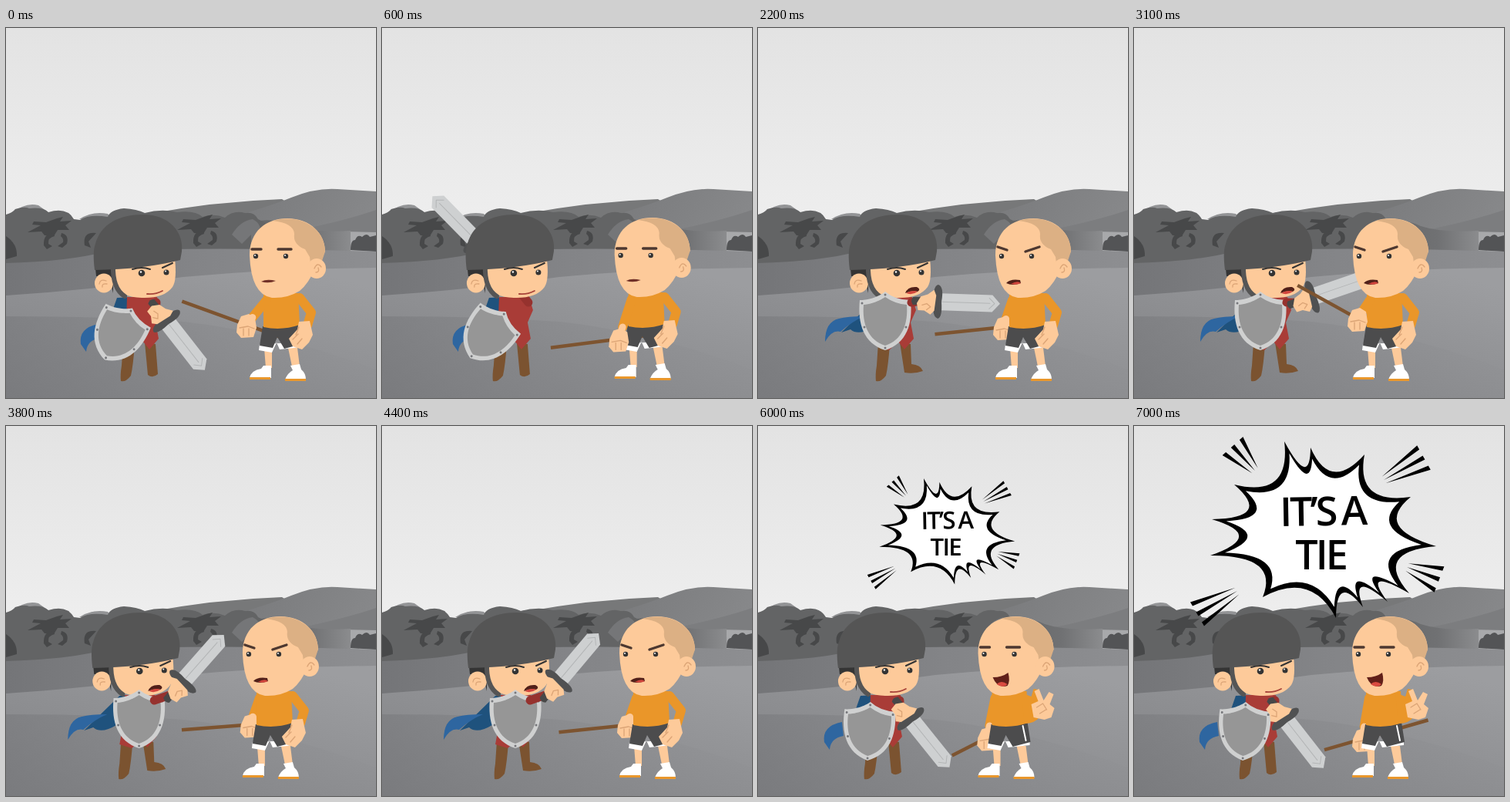
An HTML page for the animation above (7.2 s loop, 480 by 480 pixels).

```html
<!DOCTYPE html>
<html lang="en">
<head>
<meta charset="utf-8">
<title>Duel</title>
<style>
html, body { margin: 0; width: 100%; height: 100%; overflow: hidden; background: #eee; }
svg { display: block; width: 100vw; height: 100vh; }
.line { fill: none; stroke-linecap: round; stroke-linejoin: round; }
.skin { fill: #fdca9a; }
.crease { stroke: #dba476; stroke-width: 1.3; }
.word { font: 600 52px "Open Sans", "Noto Sans", sans-serif; letter-spacing: -3px; word-spacing: -3px; text-anchor: middle; }
</style>
</head>
<body>
<svg id="stage" viewBox="0 0 480 480">
<defs>
  <linearGradient id="sky" x2="0" y2="1"><stop stop-color="#e3e3e3"/><stop offset="1" stop-color="#f0f0f0"/></linearGradient>
  <linearGradient id="hill" x2="1" y2=".3"><stop stop-color="#78797b"/><stop offset="1" stop-color="#87888a"/></linearGradient>
  <linearGradient id="wood"><stop stop-color="#676869"/><stop offset=".55" stop-color="#707173"/><stop offset="1" stop-color="#8b8c8e"/></linearGradient>
  <linearGradient id="far"><stop stop-color="#747578"/><stop offset=".5" stop-color="#838487"/><stop offset="1" stop-color="#8d8e91"/></linearGradient>
  <linearGradient id="near" x1="0" y1="1" x2=".8" y2="0"><stop stop-color="#808184"/><stop offset="1" stop-color="#9c9da0"/></linearGradient>
  <linearGradient id="shade"><stop stop-color="#727376" stop-opacity=".45"/><stop offset="1" stop-color="#8a8b8e" stop-opacity=".1"/></linearGradient>
  <g id="spot" fill="#474849">
    <path d="M28 265L45 256 34 255 36 251 52 252 66 247 74 245 70 251 85 250 77 256 82 262 67 262 62 270 50 269 46 264Z"/>
    <path d="M62 266Q48 266 49 282L53 287 60 283 55 280Q54 272 63 270ZM72 266Q82 268 79 280L73 285 67 283 74 278Q75 273 71 270Z"/>
  </g>
</defs>

<g id="scene">
  <rect width="480" height="300" fill="url(#sky)"/>
  <path fill="#777879" d="M180 242Q270 225 358 222L420 262H180Z"/>
  <path fill="url(#hill)" d="M290 246Q340 232 370 220 402 207 430 209L480 212V300H300Z"/>
  <path fill="#7c7d7f" d="M380 262Q440 250 480 236V265H390Z"/>
  <path fill="#939496" d="M10 240Q24 226 42 230L56 240ZM95 248Q112 237 132 241L140 250Z"/>
  <path fill="#a8a9ab" d="M438 264L480 265V290H440Z"/>
  <path fill="url(#wood)" d="M330 250Q350 247 372 257 400 266 447 263V290H330Z"/>
  <path fill="#636465" d="M0 242Q8 240 12 235 24 231 30 234 48 232 55 239 79 232 88 248L96 249Q108 241 132 245 135 236 153 234 170 235 180 240 202 234 222 239 245 236 255 245 270 240 284 246 295 236 310 240 322 238 327 248L357 263V290L0 306Z"/>
  <path fill="#757678" d="M293 268Q304 250 320 248 334 255 328 270L318 285 318 268 306 280Z"/>
  <use href="#spot"/>
  <use href="#spot" x="194" y="-3"/>
  <path fill="#474849" d="M0 270Q15 280 14 296L0 300ZM117 266Q99 264 102 282L110 285 107 277ZM340 262L352 266 348 275 360 288H338Z"/>
  <path fill="#535456" d="M447 288Q447 275 453 275 456 267 462 271 468 265 472 271L480 269V290Z"/>
  <path fill="url(#far)" d="M0 305Q80 303 130 290 250 283 480 290V480H0Z"/>
  <path fill="url(#near)" d="M0 347Q110 340 230 323 350 312 480 311V480H0Z"/>
  <path fill="url(#shade)" d="M0 374Q130 374 230 381 350 394 480 443V480H0Z"/>
</g>

<g id="knight">
  <g id="capeRest">
    <path fill="#1f527d" d="M144 350L164 349 145 395 130 390Z"/>
    <path fill="#2e66a0" d="M120 384Q94 389 97 410L104 420Q105 405 122 402Z"/>
  </g>
  <g id="capeFlow">
    <path fill="#1f527d" d="M150 350L165 349 146 388Q126 400 116 391L104 395Z"/>
    <path fill="#2e66a0" d="M134 374Q112 374 101 377 83 381 83 407 92 391 103 394 119 380 134 374Z"/>
  </g>
  <path fill="#7b5330" d="M152 408L167 410Q165 438 162 451 155 460 149 458Q148 450 150 438Z"/>
  <path id="bootRest" fill="#7b5330" d="M180 408L194 410 197 449Q190 455 184 450Z"/>
  <path id="bootStep" fill="#7b5330" d="M180 408L194 410 195 436Q207 437 210 445 199 449 186 447Z"/>
  <path fill="#a93c37" d="M157 349H196L201 366 194 382 198 403 186 417 178 407 166 418 150 413 156 380Z"/>
  <g id="knightHead">
    <path fill="#343434" d="M116 312H139V344L134 322H117Z"/>
    <ellipse class="skin" cx="127" cy="331" rx="12" ry="12.5"/>
    <path class="line crease" d="M121 332Q122 325 130 328M125 336Q124 331 131 332"/>
    <path class="skin" d="M138 305L219 299Q222 327 216 336 205 351 176 350 149 349 142 334Z"/>
    <path class="line" stroke="#555" stroke-width="6" d="M139 308Q138 338 154 348"/>
    <path fill="#555" d="M115 314Q112 290 116 280C123 254 147 242 178 242 211 242 231 264 228 290L226 301Q180 313 115 314Z"/>
    <g fill="#343434"><circle cx="176" cy="318" r="4.3"/><circle cx="208" cy="317" r="3.5"/></g>
    <g fill="#fff"><circle cx="175" cy="316.5" r="1.2"/><circle cx="207" cy="315.5" r="1"/></g>
    <path class="line" stroke="#343434" stroke-width="2" d="M164 313Q176 309 187 313M203 311L216 305"/>
    <path id="knightSmile" class="line" stroke="#a7433a" stroke-width="1.8" d="M183 345Q194 346 203 341"/>
    <g id="knightShout">
      <path fill="#512019" d="M187 344Q190 335 202 336 208 339 203 342 196 340 187 344Z"/>
      <path fill="#d3463d" d="M188 344Q196 339 203 342 196 347 188 344Z"/>
    </g>
  </g>
  <g id="shield">
    <path fill="#cfd0d0" d="M0-38Q13-27 33-27C36 4 28 29 0 38-28 29-36 4-33-27-13-27 0-38 0-38Z"/>
    <path fill="#969696" d="M0-31Q13-22 28-21C30 4 22 25 0 32-22 25-30 4-28-21-13-22 0-31 0-31Z"/>
    <path class="line" stroke="#76777b" stroke-width="3" d="M0-34h0M0 35h0M-30-23h0M30-23h0M-27 8h0M27 8h0"/>
  </g>
  <g id="weapon">
    <line id="sleeve" class="line" stroke="#96322e" stroke-width="11"/>
    <g id="sword">
      <path fill="#ced0d1" d="M4-11H71L81 0 71 11H4Z"/>
      <path class="line" stroke="#b3b5b6" d="M5 0H68M67-7L74 0 67 7"/>
      <path fill="#484848" d="M-32-5Q-10-6 2-4V4L-32 5Q-36 0-32-5Z"/>
      <path fill="#505152" d="M0-22Q8-20 5 0 7 20 1 22-7 20-5 0-7-20 0-22Z"/>
      <path class="skin" d="M-27 3L-22-6-13-9-5-15-2-8-4 12-9 17-17 12-25 12Z"/>
      <path class="line crease" d="M-20 5L-14 3-9 7M-14 11L-9 7"/>
    </g>
  </g>
</g>

<g id="man">
  <line id="stick" x1="-51" x2="89" stroke="#7d5430" stroke-width="4.5"/>
  <g id="grip">
    <line id="upperArm" class="line" stroke="#ea9629" stroke-width="12"/>
    <line id="forearm" class="line" stroke="#fdca9a" stroke-width="9"/>
    <g id="hand">
      <path class="skin" d="M-12 0L-7-11 3-14 11-9 13 4 9 16-7 17-13 10Z"/>
      <path class="line crease" d="M-9 4L2 2 10 5M-4 5V14M3 5V14"/>
    </g>
  </g>
  <g id="torso">
    <path class="skin" d="M335 415H345V441H337ZM366 415H378L381 439H371Z"/>
    <path fill="#fff" d="M316 454Q318 444 331 442L334 438H344V454ZM362 456Q365 448 372 444L369 438 381 436 383 443Q389 448 389 456ZM329 410L328 418 345 421 351 408 355 417 383 414V408Z"/>
    <path fill="#e9972c" d="M316 453H343V456H316ZM362 455H389V458H362Z"/>
    <path fill="#4c4c4d" d="M333 387L380 384 384 410 361 416 352 401 346 415 329 412Z"/>
    <path fill="#ea9629" d="M334 344H379L381 385Q358 393 334 388Z"/>
  </g>
  <g id="armRest">
    <path class="line" stroke="#ea9629" stroke-width="12" d="M381 350L396 369 391 386"/>
    <path class="skin" d="M380 381L394 380 398 398 393 408 384 417 372 413 367 403 378 391Z"/>
    <path class="line crease" d="M372 404L379 397M378 410L384 403M380 388L376 398"/>
  </g>
  <g id="armRaised">
    <path fill="#ea9629" d="M372 346L385 351 388 341 394 342 396 377Q390 386 376 386Z"/>
    <path class="line" stroke="#fff" stroke-width="2" d="M374 389L378 408"/>
    <path class="skin" d="M385 361L394 357 389 344 395 341 401 356 408 345 414 348 409 361 415 366 411 378 402 381 388 378Z"/>
    <path class="line crease" d="M392 365L400 360 405 368M396 373L404 368"/>
  </g>
  <g id="manHead">
    <path class="skin" d="M316 295C316 264 337 247 365 247 395 247 414 267 414 290L400 313Q393 331 381 341 365 351 345 350 318 346 316 295Z"/>
    <path fill="#dcb084" d="M346 250C384 240 414 261 414 290L410 302 396 314 394 297 388 287Q372 281 374 267 373 253 346 250Z"/>
    <ellipse class="skin" cx="403" cy="312" rx="12" ry="13"/>
    <path class="line crease" d="M400 312Q404 303 409 310M402 317Q407 317 405 311"/>
    <g fill="#343434"><circle cx="324" cy="296" r="3.2"/><circle cx="363" cy="296" r="3.2"/></g>
    <g fill="#fff"><circle cx="323" cy="295" r="1"/><circle cx="362" cy="295" r="1"/></g>
    <g class="line" stroke="#4d3830" stroke-width="3.4">
      <path id="browFlat" d="M319 287H331M353 287H370"/>
      <path id="browAngry" d="M319 284L331 288M355 290L373 284"/>
    </g>
    <path id="manCalm" fill="#713027" d="M331 329Q338 325 350 328 341 332 331 329Z"/>
    <g id="manShout">
      <path fill="#512019" d="M330 331Q335 325 348 327L349 331Q338 335 330 331Z"/>
      <path fill="#d3463d" d="M336 332Q345 327 349 331 344 334 336 332Z"/>
    </g>
    <g id="manTalk">
      <path fill="#612019" d="M335 326Q347 326 355 320 358 331 354 337 341 341 335 326Z"/>
      <path fill="#d94b40" d="M340 335Q346 329 354 335 349 341 340 335Z"/>
    </g>
  </g>
</g>

<g id="bubble">
  <path id="burst"/>
  <path id="paper" fill="#fff"/>
  <path id="rays"/>
  <text class="word" x="245" y="129" transform="rotate(-1 245 129)">IT’S A</text>
  <text class="word" x="242" y="186">TIE</text>
</g>
</svg>

<script>
const LOOP = 7200;
const CENTER = [245, 140];
const el = {};
document.querySelectorAll("[id]").forEach(node => el[node.id] = node);

const set = (node, attrs) => Object.entries(attrs).forEach(([k, v]) => node.setAttribute(k, v));
const show = (node, on) => { node.style.display = on ? "" : "none"; };
const clamp = p => Math.min(1, Math.max(0, p));
const lerp = (a, b, p) => a + (b - a) * p;
const mix = (a, b, p) => a.map((v, i) => lerp(v, b[i], p));

// A strike first pulls back; everything else settles softly.
const strike = p => p * p * (5 * p - 4);
const settle = p => 1 - (1 - p) ** 4;

// Limbs are [x, y, angle] in the coordinates of their owner.
const ready = {
  knight: [0, 0], sword: [208, 380, 52], shield: [155, 396, 3],
  man: [0, 0], stick: [312, 385, 200], ease: settle
};
const fight = { ...ready, sword: [229, 355, 2], shield: [161, 380, 0], fighting: true, angry: true, shouting: true };
const low = { man: [-8, 0], stick: [326, 388, 174], tucked: true };

const POSES = [
  { ...ready, at: 0, shield: [146, 397, 28] },
  { ...fight, at: 1400, knight: [15, 0], shield: [156, 394, 0], man: [42, 3], stick: [284, 328, 280], angry: false, ease: strike },
  { ...fight, ...low, at: 2200, knight: [4, 0] },
  { ...fight, at: 3100, knight: [3, 0], sword: [228, 349, -19], man: [-32, 0], stick: [322, 377, 209], ease: strike },
  { ...fight, ...low, at: 4400, knight: [-3, 0], sword: [232, 331, -50], shield: [176, 380, 0] },
  { ...ready, at: 5100, sword: [218, 376, 42], fighting: true },
  { ...ready, at: 7000, knight: [-12, 0], man: [-33, 0], stick: [329, 406, 344], tucked: true, talking: true }
];

function poseAt(t) {
  const next = POSES.findIndex(pose => pose.at > t);
  if (next < 0) return POSES[POSES.length - 1];
  const from = POSES[next - 1], to = POSES[next];
  const p = to.ease((t - from.at) / (to.at - from.at));
  const pose = { ...(p > .5 ? to : from) };
  for (const part of ["knight", "sword", "shield", "man", "stick"]) pose[part] = mix(from[part], to[part], p);
  // The opening blow is swung from behind the head.
  const swing = Math.sin(Math.PI * clamp((t - 200) / 1200));
  pose.sword = pose.sword.map((v, i) => v + swing * [-85, -130, -235][i]);
  return pose;
}

const place = (node, [x, y, angle = 0]) => set(node, { transform: `translate(${x} ${y}) rotate(${angle})` });
const segment = (node, [x1, y1], [x2, y2]) => set(node, { x1, y1, x2, y2 });

function drawKnight({ knight, sword, shield, fighting }) {
  place(el.knight, knight);
  place(el.sword, sword);
  place(el.shield, shield);
  const [x, y, angle] = sword, turn = angle * Math.PI / 180;
  segment(el.sleeve, [195, 356], [x - 22 * Math.cos(turn), y - 22 * Math.sin(turn)]);
  el.knight.insertBefore(el.weapon, angle < -60 ? el.knightHead : null);
  for (const part of [el.capeFlow, el.bootStep, el.knightShout]) show(part, fighting);
  for (const part of [el.capeRest, el.bootRest, el.knightSmile]) show(part, !fighting);
}

function drawMan({ man, stick, tucked, angry, shouting, talking }) {
  place(el.man, man);
  place(el.stick, stick);
  place(el.hand, stick.slice(0, 2));
  const shoulder = [338, 353], elbow = mix(shoulder, stick, .7);
  segment(el.upperArm, shoulder, elbow);
  segment(el.forearm, elbow, stick);
  el.man.insertBefore(el.grip, tucked ? el.torso : el.manHead);
  show(el.armRest, !talking);
  show(el.armRaised, talking);
  show(el.manTalk, talking);
  show(el.manShout, shouting);
  show(el.manCalm, !talking && !shouting);
  show(el.browAngry, angry);
  show(el.browFlat, !angry);
}

function drawBubble(t) {
  const [x, y] = CENTER, scale = lerp(.6, 1, clamp((t - 6000) / 200));
  show(el.bubble, t >= 6000);
  set(el.bubble, { transform: `translate(${x} ${y}) scale(${scale}) translate(${-x} ${-y})` });
}

// A star whose sides bow in toward the middle.
const star = (points, pull) => "M" + points[0] + points.map((point, i) => {
  const next = points[(i + 1) % points.length];
  return `Q${mix(mix(point, next, .5), CENTER, pull)} ${next}`;
}).join("") + "Z";

// Three wedges spread from a narrow inner end to a wide outer end.
function fan(x, y, outerX, outerY) {
  const length = Math.hypot(outerX - x, outerY - y);
  const nx = (y - outerY) / length, ny = (outerX - x) / length;
  return [-1, 0, 1].map(i => {
    const at = (side, px, py) => `${px + nx * side} ${py + ny * side}`;
    return `M${at(i * 5, x, y)}L${at(i * 15 - 3, outerX, outerY)} ${at(i * 15 + 3, outerX, outerY)}Z`;
  }).join("");
}

const spikes = [[195, 20], [229, 28], [299, 37], [359, 92], [392, 156], [357, 217], [329, 228],
  [297, 235], [262, 249], [167, 222], [99, 168], [101, 121], [130, 76]];
set(el.burst, { d: star(spikes, .5) });
set(el.paper, { d: star(spikes.map(point => mix(point, CENTER, .13)), .45) });
set(el.rays, { d: fan(157, 58, 128, 26) + fan(324, 70, 376, 41) + fan(354, 183, 396, 199) + fan(134, 214, 82, 244) });

function draw(now) {
  const time = now % LOOP;
  const beat = time < 2400 || time >= 5600 ? 200 : 100;
  const t = Math.floor(time / beat) * beat;
  const pose = poseAt(t);
  drawKnight(pose);
  drawMan(pose);
  drawBubble(t);
}

const start = performance.now();
function tick() {
  draw(performance.now() - start);
  requestAnimationFrame(tick);
}
tick();
</script>
</body>
</html>
```
